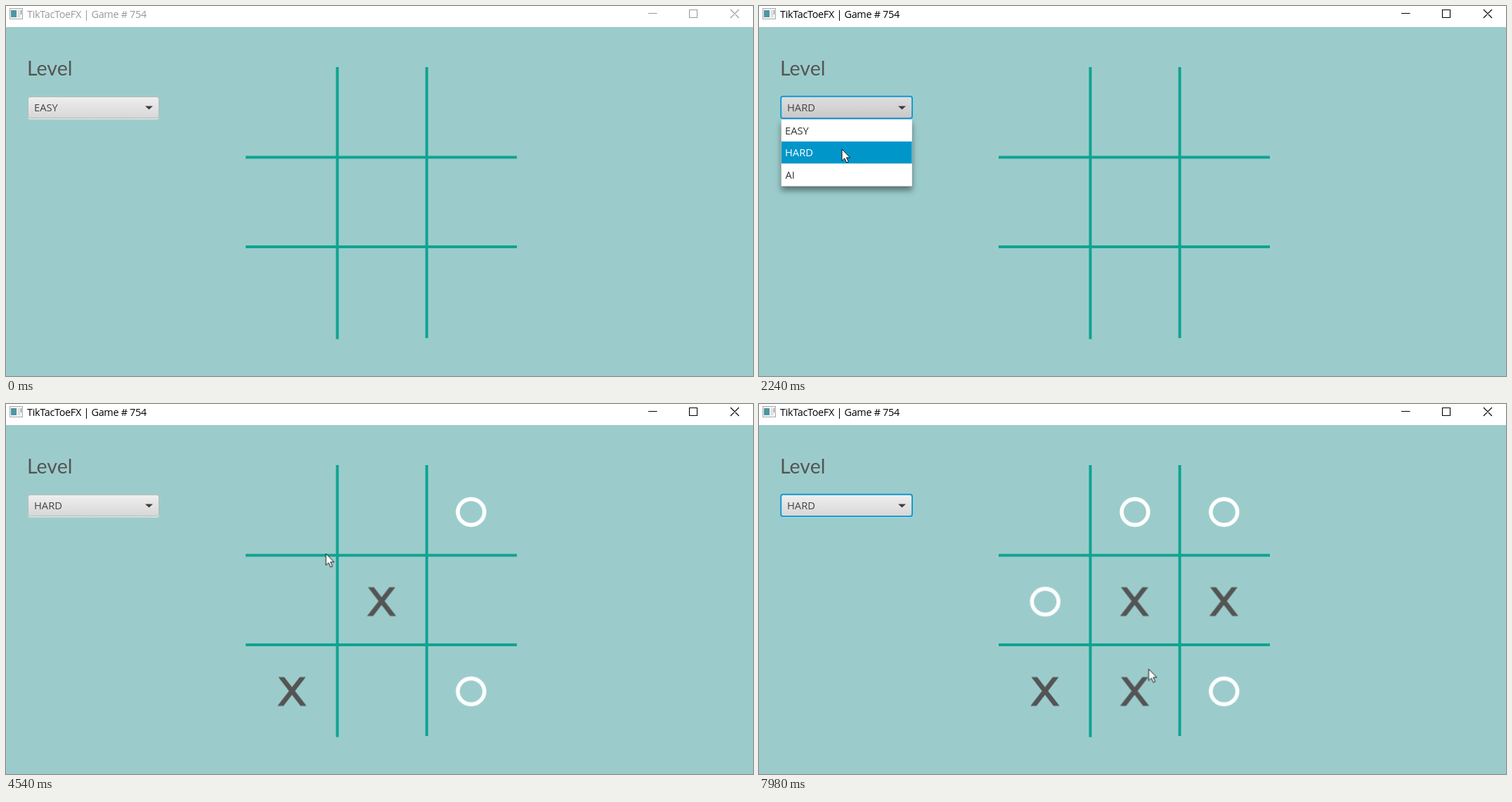
Animation of 1063 by 527 pixels, one loop 8000 ms. Source, as an HTML page:

```html
<!DOCTYPE html>
<html lang="en">
<head>
<meta charset="utf-8">
<title>Tic-tac-toe</title>
<style>
html, body { margin: 0; width: 100%; height: 100%; overflow: hidden; background: #9bcccb; }
svg { display: block; width: 1063px; height: 527px; font-family: "Open Sans", "Noto Sans", sans-serif; }
text { font-size: 14.7px; }

/* Everything runs on one 8 s clock; states switch hard, the pointer glides. */
.t { animation: 8s step-end infinite; }
.bar { animation-name: activate; color: #999; }
.bar text { font-size: 14.4px; letter-spacing: -.3px; fill: currentColor; }
.buttons { fill: none; stroke: currentColor; stroke-width: 1.1; }
.level { font: 28.5px Lato, "Open Sans", sans-serif; fill: #545454; }
.grid { stroke: #10a391; stroke-width: 4; }
.combo text { fill: #444; }
.focus { animation-name: focus; fill: none; stroke: #159dd3; stroke-width: 2; }
.armed { animation-name: armed; }
.easy { animation-name: easy; }
.hard { animation-name: hard; }
.popup { animation-name: popup; filter: drop-shadow(0 6px 4px rgba(0, 0, 0, .42)); }
.row text { fill: currentColor; }
.r1 { animation-name: row1; }
.r2 { animation-name: row2; }
.r3 { animation-name: row3; }
.ring { animation-name: easy; fill: none; stroke: #38b0dc; }
.x { fill: #545454; }
.o { fill: none; stroke: #fff; stroke-width: 5.6; }
.m1 { animation-name: m1; }
.m2 { animation-name: m2; }
.m3 { animation-name: m3; }
.m4 { animation-name: m4; }
.m5 { animation-name: m5; }
.m6 { animation-name: m6; }
.m7 { animation-name: m7; }
.m8 { animation-name: m8; }
.pointer { animation: enter 8s step-end infinite, move 8s linear infinite; }

@keyframes activate { 0% { color: #999 } 14.5%, to { color: #000 } }
@keyframes focus { 0% { opacity: 0 } 14.5% { opacity: 1 } 40.5% { opacity: 0 } 93.8%, to { opacity: 1 } }
@keyframes armed { 0% { opacity: 0 } 17% { opacity: 1 } 29.75%, to { opacity: 0 } }
@keyframes easy { 0% { opacity: 1 } 28%, to { opacity: 0 } }
@keyframes hard { 0% { opacity: 0 } 28%, to { opacity: 1 } }
@keyframes popup { 0% { opacity: 0 } 17% { opacity: 1 } 29.75%, to { opacity: 0 } }
@keyframes row1 { 0% { fill: #0096c9; color: #fff } 28%, to { fill: #fff; color: #333 } }
@keyframes row2 {
  0% { fill: #fff; color: #333 }
  19.2% { fill: #0096c9; color: #fff }
  20.4% { fill: #fff; color: #333 }
  24.7%, to { fill: #0096c9; color: #fff }
}
@keyframes row3 {
  0% { fill: #fff; color: #333 }
  20.4% { fill: #0096c9; color: #fff }
  24.7%, to { fill: #fff; color: #333 }
}
@keyframes m1 { 0% { opacity: 0 } 40.5%, to { opacity: 1 } }
@keyframes m2 { 0% { opacity: 0 } 41.3%, to { opacity: 1 } }
@keyframes m3 { 0% { opacity: 0 } 49.6%, to { opacity: 1 } }
@keyframes m4 { 0% { opacity: 0 } 50.4%, to { opacity: 1 } }
@keyframes m5 { 0% { opacity: 0 } 69.4%, to { opacity: 1 } }
@keyframes m6 { 0% { opacity: 0 } 70.2%, to { opacity: 1 } }
@keyframes m7 { 0% { opacity: 0 } 93%, to { opacity: 1 } }
@keyframes m8 { 0% { opacity: 0 } 93.8%, to { opacity: 1 } }
@keyframes enter { 0% { opacity: 0 } 6.5%, to { opacity: 1 } }
@keyframes move {
  0%, 6.5% { transform: translate(316px, 368px) }
  9.5% { transform: translate(228px, 262px) }
  13% { transform: translate(94px, 118px) }
  15.4%, 17% { transform: translate(103px, 144px) }
  21.25%, 23% { transform: translate(117.5px, 232.5px) }
  25.5%, 29.7% { transform: translate(118px, 204px) }
  33.75%, 35.4% { transform: translate(286px, 342.5px) }
  39.6%, 41.2% { transform: translate(416px, 417px) }
  44% { transform: translate(455px, 361px) }
  46.5%, 47.3% { transform: translate(503.5px, 301.5px) }
  49.5%, 51.4% { transform: translate(564px, 274px) }
  55.5% { transform: translate(436px, 226px) }
  61% { transform: translate(520px, 170px) }
  62% { transform: translate(536px, 172px) }
  67.75%, 68.6% { transform: translate(653.5px, 258.5px) }
  71.9%, 72.8% { transform: translate(660px, 299px) }
  77% { transform: translate(654px, 341px) }
  82.2%, 83.1% { transform: translate(620px, 390px) }
  84%, 84.8% { transform: translate(589.5px, 406.5px) }
  87.2%, 89.7% { transform: translate(567.5px, 392px) }
  89.8%, 93% { transform: translate(566.5px, 391.5px) }
  99.7%, to { transform: translate(554.5px, 377.5px) }
}
</style>
</head>
<body>
<svg viewBox="0 0 1063 527">
  <defs>
    <linearGradient id="face" x2="0" y2="1">
      <stop stop-color="#efefef"/><stop offset="1" stop-color="#d7d7d7"/>
    </linearGradient>
    <linearGradient id="dark" x2="0" y2="1">
      <stop stop-color="#dedede"/><stop offset="1" stop-color="#c9c9c9"/>
    </linearGradient>
    <path id="x" d="M-19.5-20.5h8.5L20.7 20.5h-8.6zM11-20.5h8.5L-12.1 20.5h-8.6z"/>
    <ellipse id="o" rx="18.9" ry="18.4"/>
  </defs>

  <rect width="1063" height="527" fill="#9bcccb"/>
  <rect width="1063" height="30" fill="#fff"/>

  <rect x="5.5" y="3.5" width="18" height="15" fill="#f4f4f4" stroke="#aaa"/>
  <rect x="7" y="6" width="8" height="10" fill="#4d96a3"/>
  <path d="M17 6h3v10h-3z" fill="#ddd"/>
  <path d="M21.5 6v6" stroke="#778"/>

  <g class="t bar">
    <text x="30" y="17">TikTacToeFX | Game # 754</text>
    <path class="buttons" d="M914 10.5h12.5M972.5 5.5h11v11h-11zM1031 5l12 12M1043 5l-12 12"/>
  </g>

  <text class="level" x="30" y="99">Level</text>

  <path class="grid" d="M471.5 87v387.5M598.7 87v386M341 215.5h386M341 343h386"/>

  <g class="combo">
    <rect x="31.5" y="131" width="186" height="30.5" rx="3" fill="#dcebea"/>
    <rect x="31.5" y="129.5" width="186" height="30" rx="3" fill="url(#face)" stroke="#b9b9b9"/>
    <rect class="t armed" x="32" y="130" width="185" height="29" rx="2" fill="url(#dark)"/>
    <rect class="t focus" x="31.2" y="128.8" width="186.8" height="31.2" rx="3"/>
    <path d="M198 142.5h11l-5.5 5z" fill="#3c3c3c"/>
    <text class="t easy" x="40" y="150">EASY</text>
    <text class="t hard" x="40" y="150">HARD</text>
  </g>

  <g class="t popup">
    <rect x="31.5" y="161" width="186.5" height="96" fill="#d0d0d0"/>
    <g class="t row r1"><rect x="32" y="162" width="185.5" height="31"/><text x="37" y="183">EASY</text></g>
    <rect class="t ring" x="33.5" y="163.5" width="182.5" height="28"/>
    <g class="t row r2"><rect x="32" y="193" width="185.5" height="31.5"/><text x="37" y="214">HARD</text></g>
    <g class="t row r3"><rect x="32" y="224.5" width="185.5" height="31.5"/><text x="37.5" y="246">AI</text></g>
  </g>

  <g class="x">
    <use class="t m1" href="#x" x="407" y="409.5"/>
    <use class="t m3" href="#x" x="534.5" y="281.5"/>
    <use class="t m5" href="#x" x="661.5" y="281.5"/>
    <use class="t m7" href="#x" x="534.5" y="409.5"/>
  </g>
  <g class="o">
    <use class="t m2" href="#o" x="661.8" y="409.3"/>
    <use class="t m4" href="#o" x="661.8" y="153.8"/>
    <use class="t m6" href="#o" x="407.3" y="281.5"/>
    <use class="t m8" href="#o" x="535" y="153.8"/>
  </g>

  <path class="pointer" d="M0 0v16.5l3.8-3.6 2.8 6.2 2.7-1.2-2.8-6H11.5z" fill="#fff" stroke="#111"/>
</svg>
</body>
</html>
```
